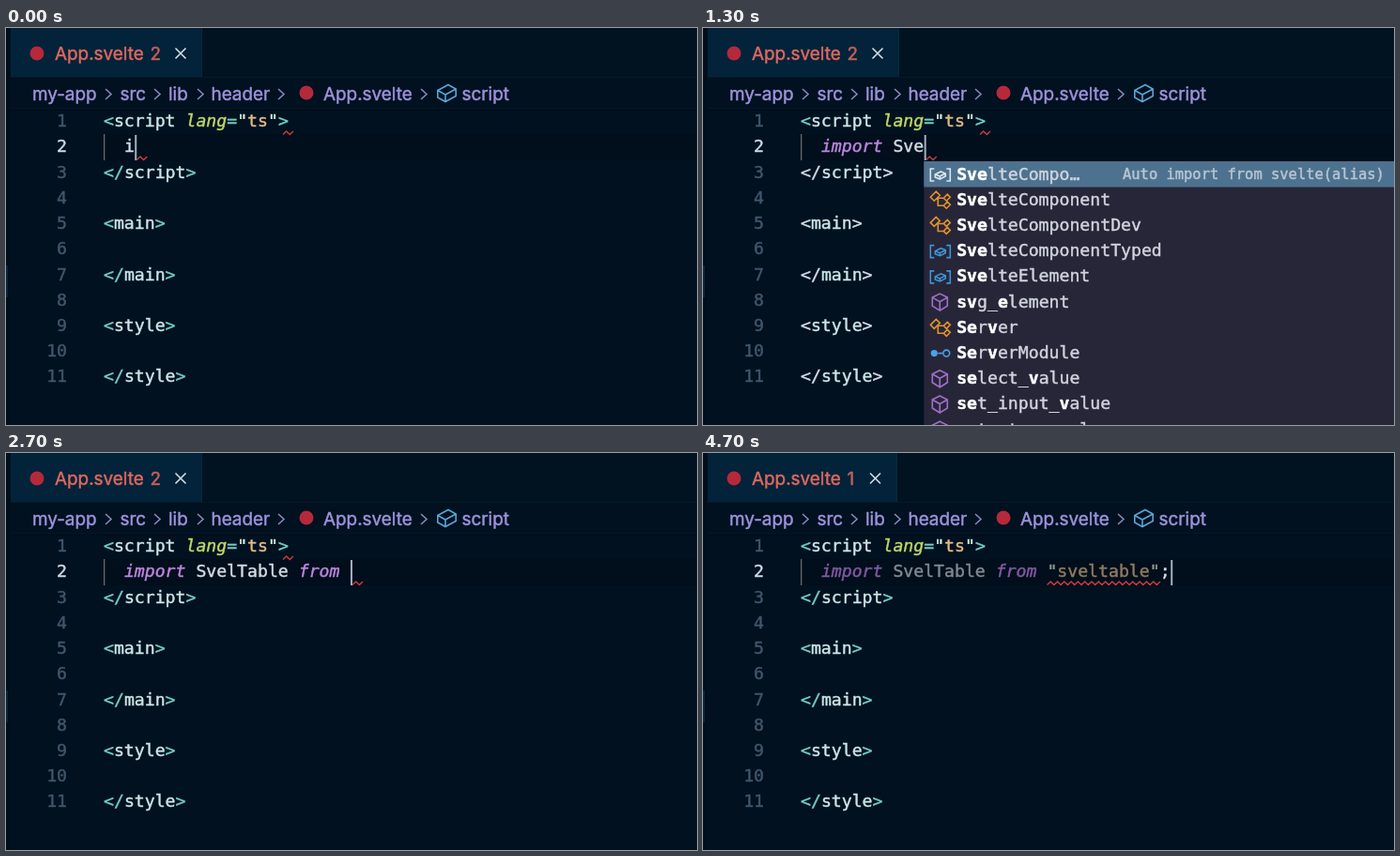
Recreate the animation shown at these times as an HTML page. Size 736 by 423 pixels, loop 4.8 s.

```html
<!DOCTYPE html>
<html lang="en">
<head>
<meta charset="utf-8">
<title>Typing an import</title>
<style>
  html, body { margin: 0; width: 100%; height: 100%; overflow: hidden; background: #011120; }
  svg { display: block; width: 736px; height: 423px; }
  text { white-space: pre; stroke-width: .45; }
  .ui { font: 18.9px Inter, "Liberation Sans", sans-serif; }
  .code { font: 18.17px "DejaVu Sans Mono", monospace; }
  .detail { font: 15.45px "DejaVu Sans Mono", monospace; fill: #b9c5d2; stroke: #b9c5d2; }
  .item { fill: #d0d4df; stroke: #d0d4df; }
  .hit { font-weight: 700; fill: #fff; stroke: #fff; }
  .it { font-style: italic; }
  .line { fill: none; stroke-width: 1.6; }
  .wave { fill: none; stroke: #cb3b3d; stroke-width: 1.4; }
</style>
</head>
<body>
<svg viewBox="0 0 736 423"><g id="base"></g><g id="live"></g></svg>
<script>
const CH = 10.94, ROW = 27.22, LEFT = 104, LOOP = 4800;
const TEAL = '#72cfc0', TAG = '#cbe6e6', PLAIN = '#d2dbe7', PURPLE = '#be85e0', CRUMB = '#9d94dc';

const esc = s => s.replace(/&/g, '&amp;').replace(/</g, '&lt;');
const ink = c => `fill="${c}" stroke="${c}"`;
const span = (s, color, cls = '') => `<tspan ${ink(color)} class="${cls}">${esc(s)}</tspan>`;
const text = (x, y, cls, body, more = '') => `<text x="${x}" y="${y}" class="${cls}" ${more}>${body}</text>`;
const rect = (x, y, w, h, fill) => `<rect x="${x}" y="${y}" width="${w}" height="${h}" fill="${fill}"/>`;
const path = (d, stroke, more = '') => `<path class="line" d="${d}" stroke="${stroke}" ${more}/>`;
const baseline = n => 105.2 + ROW * (n - 1);

function wave(x1, x2, y) {
  let d = `M${x1} ${y}`;
  for (let x = x1 + 3.65, up = true; x <= x2 + 1; x += 3.65, up = !up) d += `L${x} ${up ? y - 3.6 : y}`;
  return `<path class="wave" d="${d}"/>`;
}

// Icons sit in a 20 by 20 box.
const cube = c => path('M10 1L18 5V14L10 19L2 14V5ZM2 5L10 9.5L18 5M10 9.5V19', c);
const slab = c => path('M.8 7L12 1L20.2 5.5V13L9 19L.8 14.5ZM.8 7L9 11.5L20.2 5.5M9 11.5V19', c);
const icons = {
  key: () => path('M1 3H10V8H1ZM13 4H20M13 10H20M1 12H9M1 17H6M9 17H13M15 17H20', '#d3dbe4'),
  snip: () => path('M1 18V1H19V18', '#d3dbe4') + path('M1 18H20', '#d3dbe4', 'stroke-dasharray="2 2"'),
  value: active => path('M4 4H0V17H4M17 4H21V17H17M5 10L11 7L16 9V12L10 15L5 13ZM5 10L10 12L16 9M10 12V15',
    active ? '#dce6ee' : '#3f94d6'),
  cls: () => path('M0 7L6 1L10 5L4 11ZM7 8H14M8 8V16H14M14 8L18 4L21 7L17 11ZM14 16L18 12L21 15L17 19Z', '#e0922c'),
  fn: () => cube('#a06fcb'),
  face: () => path('M8 10H13', '#4aa3e8') + '<circle cx="4" cy="10" r="3.6" fill="#4aa3e8"/>' +
    '<circle class="line" cx="17" cy="10" r="3.4" stroke="#4aa3e8"/>',
  mod: () => text(-1, 16, 'code', '{}', ink('#c9cdd9')),
  js: () => '<text x="2" y="15" font-family="Inter, sans-serif" font-size="13" font-weight="700" fill="#bccb3c">JS</text>'
};

// Each entry is "icon label"; bars enclose the matched letters, and ~ starts the detail.
const lists = {
  im: ['key |im|port', 'snip |im|port statement~Import external', 'value |Im|ageBitmap',
    'value |Im|ageBitmapRenderingContext', 'value |Im|ageData', 'value |Im|age', 'value HTML|Im|ageElement',
    'value SVG|Im|ageElement', 'value create|Im|ageBitmap', 'value CSS|Im|portRule', 'value set|Im|mediate'],
  impo: ['key |impo|rt', 'snip |impo|rt statement~Import external', 'value |Im|ageBitma|p|RenderingC|o|ntext'],
  impor: ['key |impor|t', 'snip |impor|t statement~Import external'],
  sve: ['value |Sve|lteCompo…~Auto import from svelte(alias)', 'cls |Sve|lteComponent', 'cls |Sve|lteComponentDev',
    'value |Sve|lteComponentTyped', 'value |Sve|lteElement', 'fn |sv|g_|e|lement', 'cls |Se|r|v|er',
    'face |Se|r|v|erModule', 'fn |se|lect_|v|alue', 'fn |se|t_input_|v|alue', 'fn |se|t_store_|v|alue'],
  f: ['key |f|rom', 'key |f|alse', 'key |f|or', 'key |f|unction', 'key |f|inally', 'fn |f|etch', 'value |F|ile',
    'value |F|ileList', 'value |F|ileReader', 'value |F|ormData', 'value |F|unction'],
  fro: ['key |fro|m', 'value DocumentF|r|agment'],
  quote: ['mod rollup', 'mod sirv-cli', 'mod sveltable', 'mod svelte', 'mod svelte-check', 'mod svelte-preprocess',
    'js svelte.config.js', 'mod tslib', 'mod typescript', 'mod eslint', 'mod prettier'],
  svel: ['mod |svel|table', 'mod |svel|te', 'mod |svel|te-check', 'mod |svel|te-preprocess', 'js |svel|te.config.js',
    'mod *.|svel|te', 'mod eslint-plugin-|svel|te3', 'mod prettier-plugin-|svel|te'],
  table: ['mod |svelta|ble']
};
lists.svel5 = lists.sve.slice(0, 5).map(s => s.replace('|Sve|l', '|Svel|'));

// Time, typed text, open list.
const steps = [
  [0, 'i'], [100, 'im', 'im'], [300, 'imp', 'im'], [500, 'impo', 'impo'], [600, 'impor', 'impor'],
  [700, 'import', 'impor'], [800, 'import '], [1000, 'import S'], [1100, 'import Sv'], [1200, 'import Sve'],
  [1300, 'import Sve', 'sve'], [1500, 'import Svel', 'svel5'], [1600, 'import SvelT', 'svel5'],
  [1800, 'import SvelTa'], [1900, 'import SvelTab'], [2000, 'import SvelTabl'], [2100, 'import SvelTable'],
  [2200, 'import SvelTable '], [2300, 'import SvelTable f', 'f'], [2400, 'import SvelTable fr', 'f'],
  [2500, 'import SvelTable fro', 'fro'], [2600, 'import SvelTable from'], [2700, 'import SvelTable from '],
  [2900, 'import SvelTable from "'], [3000, 'import SvelTable from "', 'quote'],
  [3200, 'import SvelTable from "s', 'svel'], [3300, 'import SvelTable from "sv', 'svel'],
  [3400, 'import SvelTable from "sve', 'svel'], [3500, 'import SvelTable from "svel', 'svel'],
  [3700, 'import SvelTable from "svelt', 'svel'], [3800, 'import SvelTable from "svelta', 'table'],
  [4000, 'import SvelTable from "sveltab', 'table'], [4100, 'import SvelTable from "sveltabl', 'table'],
  [4200, 'import SvelTable from "sveltable', 'table'], [4400, 'import SvelTable from "sveltable"'],
  [4500, 'import SvelTable from "sveltable";']
];

function drawBase() {
  let out = rect(0, 0, 736, 53, '#011220') + rect(0, 0, 4, 423, '#010e1b') + rect(0, 253, 2, 34, '#04263f') +
    rect(4, 52, 732, 1, '#041a29') + rect(4, 85, 732, 1, '#021827') + rect(4, 86, 732, 2, '#010e1b') +
    rect(LEFT, 113, 632, 28, '#010e1b');
  const crumbs = [[28, 'my-app'], [121.5, 'src'], [173, 'lib'], [218.5, 'header'], [338, 'App.svelte'], [485.5, 'script']];
  for (const [x, s] of crumbs) out += text(x, 77, 'ui', s, ink(CRUMB));
  for (const x of [106, 158, 204, 290, 442]) out += path(`M${x} 65l6 5.5l-6 5.5`, '#8b86bd');
  out += '<circle cx="320" cy="69" r="7.5" fill="#b5293b"/>';
  out += `<g transform="translate(459 59.5)">${slab('#5aa5d6')}</g>`;
  for (let n = 1; n <= 11; n++) {
    out += text(65, baseline(n), 'code', n, `text-anchor="end" ${ink(n === 2 ? '#ccdbe5' : '#40566a')}`);
  }
  out += text(LEFT, baseline(1), 'code', span('<', TEAL) + span('script ', TAG) + span('lang', '#bfd866', 'it') +
    span('=', TEAL) + span('"', '#d3ecd9') + span('ts', '#e3bb85') + span('"', '#d3ecd9') + span('>', TEAL));
  return out + rect(104, 113, 1.3, 28, '#66696a');
}

function drawTab(errors) {
  const w = errors === 2 ? 203 : 201, x = errors === 2 ? 186 : 183.5;
  return rect(5, 0, w, 52, '#02233a') + rect(5 + w, 0, 1, 52, '#062a40') +
    '<circle cx="33" cy="27" r="7.5" fill="#b5293b"/>' +
    text(52, 34, 'ui', 'App.svelte', ink('#e0695f')) + text(153.5, 34, 'ui', errors, ink('#c9605a')) +
    path(`M${x - 5.5} 21.5l11 11m0 -11l-11 11`, '#d5dee6');
}

function drawTags(bracket) {
  const tags = [[3, '/', 'script'], [5, '', 'main'], [7, '/', 'main'], [9, '', 'style'], [11, '/', 'style']];
  return tags.map(([n, slash, name]) =>
    text(LEFT, baseline(n), 'code', span('<' + slash, bracket) + span(name, TAG) + span('>', bracket))).join('');
}

function drawTyped(typed) {
  const quoted = typed.includes('"'), closed = typed.split('"').length > 2;
  const shown = quoted && !closed ? typed + '"' : typed;
  const body = shown.split(/(\bimport\b|\bfrom\b|"[^"]*")/).map(s => {
    if (s === 'import' || s === 'from') return span(s, quoted ? '#8059a0' : PURPLE, 'it');
    if (s[0] === '"') return span('"', '#8b9891') + span(s.slice(1, -1), '#8f7b5f') + span('"', '#8b9891');
    return span(s, quoted && s !== ';' ? '#7f8993' : PLAIN);
  }).join('');
  const x = LEFT + 2 * CH, end = x + typed.length * CH;
  let marks;
  if (quoted) {
    const at = shown.indexOf('"'), to = shown.lastIndexOf('"') + 1;
    marks = wave(x + at * CH, x + to * CH, 140.5);
  } else {
    marks = wave(295, 305, 113.5) + wave(end + 2.5, end + 12.5, 140.5);
  }
  return text(x, baseline(2), 'code', body) + marks + rect(end + .4, 114, 2, 27, '#a0b2c2');
}

function drawList(name, typed) {
  const rows = lists[name], x = LEFT + (2 + typed.length) * CH, w = 736 - x;
  let out = rect(x, 142, w, rows.length * ROW + 4, '#272638') + rect(x, 142, w, 27.5, '#4d728f');
  rows.forEach((row, i) => {
    const [, icon, label, detail] = row.match(/^(\w+) ([^~]*)~?(.*)$/), y = 161.5 + i * ROW;
    const body = label.split('|').map((s, k) => `<tspan class="${k % 2 ? 'hit' : 'item'}">${s}</tspan>`).join('');
    out += `<g transform="translate(${x + 7} ${y - 15.5})">${icons[icon](i === 0)}</g>`;
    out += text(x + (icon === 'js' ? 37.5 : 34.9), y, 'code', body);
    if (detail) out += text(detail[0] === 'A' ? 447 : 593, y - 1, 'detail', detail);
  });
  return out;
}

const live = document.getElementById('live');
document.getElementById('base').innerHTML = drawBase();
let shownStep = -1;

function tick() {
  const now = performance.now() % LOOP;
  let i = steps.length - 1;
  while (steps[i][0] > now) i--;
  if (i !== shownStep) {
    shownStep = i;
    const [t, typed, list] = steps[i];
    live.innerHTML = drawTab(typed.includes('"') ? 1 : 2) + drawTags(t >= 800 && t < 2600 ? PLAIN : TEAL) +
      drawTyped(typed) + (list ? drawList(list, typed) : '');
  }
  requestAnimationFrame(tick);
}
tick();
</script>
</body>
</html>
```
